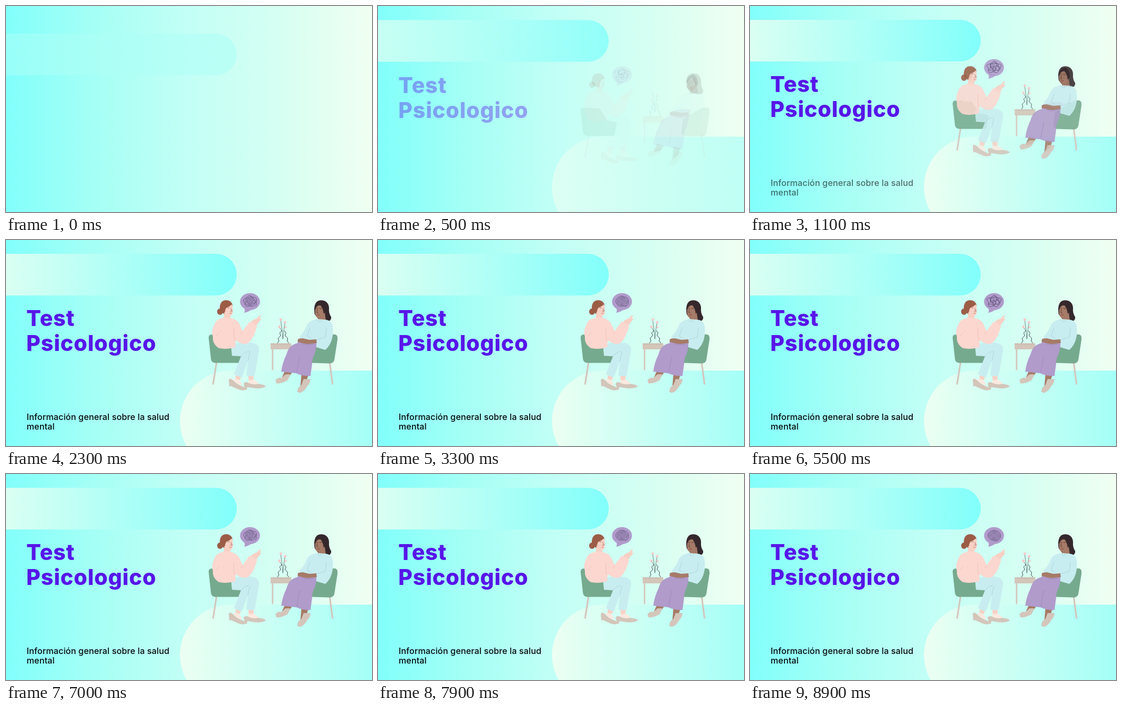
These frames come from a looping animation (690x388 px, 9000 ms). An HTML page with a canvas:

```html
<!DOCTYPE html>
<html lang="es">
<head>
<meta charset="utf-8">
<style>
  html, body { margin: 0; width: 100%; height: 100%; overflow: hidden; background: #b8fff7; }
  canvas { display: block; }
</style>
</head>
<body>
<canvas id="stage" width="690" height="388"></canvas>
<script>
const W = 690, H = 388, LOOP = 9000, STEP = 100, KNOT = 4500;
const c = document.getElementById('stage').getContext('2d');
const clamp = v => Math.max(0, Math.min(1, v));

const GREEN = '#76aa8e', BLUE = '#c8edf0', PINK = '#fcd7cf', SKIN = '#f8d0c4', PALE = '#fbe8df',
  TAN = '#d3c5b9', LILAC = '#b09bcb', BROWN = '#a67b67', DARK = '#35282c', HAIR = '#9c5d46';

function fill(color, d) {
  c.fillStyle = color;
  c.fill(new Path2D(d));
}

function line(color, width, d) {
  c.strokeStyle = color;
  c.lineWidth = width;
  c.lineCap = c.lineJoin = 'round';
  c.stroke(new Path2D(d));
}

function blob(color, x, y, rx, ry = rx) {
  c.fillStyle = color;
  c.beginPath();
  c.ellipse(x, y, rx, ry, 0, 0, 7);
  c.fill();
}

function ramp(x0, x1, ...colors) {
  const g = c.createLinearGradient(x0, 0, x1, 0);
  colors.forEach((k, i) => g.addColorStop(i / (colors.length - 1), k));
  return g;
}

// Fades a part in while it rises to its place
function rise(t, start, length, draw) {
  const p = clamp((t - start) / length);
  if (!p) return;
  c.save();
  c.globalAlpha = p;
  c.translate(0, 26 * (1 - p) ** 5);
  draw();
  c.restore();
}

function backdrop() {
  c.fillStyle = ramp(0, W, '#82fffb', '#a6fff5', '#c3fff6', '#d6fff2', '#f0fff2');
  c.fillRect(0, 0, W, H);
}

function pill(t) {
  const p = clamp(t / 700);
  c.save();
  c.globalAlpha = 0.25 + 0.75 * p;
  c.translate(0, 26 * (1 - p) ** 3);
  c.fillStyle = ramp(0, 435, '#daFFF2', '#82fffb');
  c.beginPath();
  c.roundRect(-60, 26, 495, 78.5, 39.25);
  c.fill();
  c.restore();
}

function base() {
  c.fillStyle = ramp(328, W, '#ecfff2', '#a4fff7');
  c.beginPath();
  c.roundRect(328, 246, 460, 190, 95);
  c.fill();
}

function text(lines, font, color, x, y, gap, spacing) {
  c.font = font + ' Inter, sans-serif';
  c.letterSpacing = spacing;
  c.fillStyle = color;
  lines.forEach((s, i) => c.fillText(s, x, y + i * gap));
}

// A spiral whose loops are tangled at first and then smooth out
function knot(t) {
  const p = (t % KNOT) / KNOT;
  const mess = (1 - p) ** 1.5, turns = 5, n = 320;
  c.beginPath();
  for (let i = 0; i <= n; i++) {
    const u = i / n, a = u * turns * 2 * Math.PI + p * 1.5;
    const r = (1 + 12 * u) * (1 + mess * 0.25 * Math.sin(a * 5.3 + 2 * p));
    const k = mess ** 2 * 5 * Math.sin(Math.PI * u);
    c.lineTo(460 + r * Math.cos(a) + k * Math.sin(a * 1.7 + 1),
      116 + r * 0.84 * Math.sin(a) + k * 0.8 * Math.cos(a * 2.3));
  }
  c.strokeStyle = '#4a3f60';
  c.lineWidth = 0.75;
  c.stroke();
}

function bubble(t) {
  blob(LILAC, 460, 116, 18.8, 16);
  fill(LILAC, 'M448 126 Q452 132 449 137 Q457 136 464 130Z');
  knot(t);
}

function chair(leg, body) {
  line(TAN, 3, leg);
  fill(GREEN, body);
}

function listener() {
  chair('M397 230 L390.5 271',
    'M382 184 Q382 178 388 178 L418 180 L432 202 L450 206 L446 229 Q445 231 441 231.5 L395 231.5 Q388 231 386.5 225Z');
  // feet, then trousers
  fill(SKIN, 'M433 250 L444 254 L441 264 L433 262Z M456 252 L467 252 L466 265 L458 265Z');
  fill(BLUE, 'M424 197 Q446 191 466 194 Q479 198 477 209 L469 255 Q461 258 453 255 L456 228 L445 258 Q436 258 430 252 L443 219 L426 218Z');
  line('#a9cfdb', 0.8, 'M456 228 L460 211 M443 219 Q449 211 458 210');
  fill(TAN, 'M420 263 Q423 259 428 264 Q434 271 444 275 Q452 278 452 282 Q444 285 435 280 L424 275 L421 276Z');
  fill(TAN, 'M448 271 Q449 267 455 268 Q465 273 475 271 Q488 272 490 276 Q480 281 468 279 L455 277 L454 282 L451 282Z');
  fill(PALE, 'M429 262 Q441 261 445 273 Q435 273 429 264Z M457 264 L467 263 L477 270 Q466 274 457 269Z');
  // head
  blob(HAIR, 403.5, 135, 5.5, 6);
  fill(HAIR, 'M403 129 Q403 114 415 113.3 Q425 114 427.5 123 L420 126 L417 140 L411 139 Q404 136 403 129Z');
  fill(SKIN, 'M412 135 L423 139 L423 150 L410 149Z');
  fill(SKIN, 'M415 128 Q422 125 426.5 121 Q428 130 427.5 138 Q425 144 419 143 Q413 141 413 133Z');
  line('#7d4a3e', 0.7, 'M418 128 L421 127.5 M424 129 L426.5 134 L423 134');
  line('#d8716a', 1.1, 'M422 138 L425 138');
  // jumper and raised hand
  fill(SKIN, 'M460 158 L464 152 Q469 149 474 147 L478 142 Q481.5 142 480 145 L478 148 L482 149 L476 155 L471 163Z');
  fill(PINK, 'M409 147 Q417 145 424 147 Q436 150 440 158 L446 172 L459 154 Q468 156 473 163 Q467 185 458 193 Q450 199 440 193 L433 189 L432 202 Q414 207 401 203.5 Q389 196 390 182 Q386 172 393 159 Q396 149 409 147Z');
  line('#e9b8ad', 0.7, 'M430 166 Q428 178 431 190 M397 181 Q399 176 402 174 M446 172 L443 178');
}

function table() {
  line(TAN, 2.6, 'M502.5 203 V244');
  fill(TAN, 'M499 194.5 H538 V206 H499Z');
  line('#bba99d', 0.7, 'M500 196 H534');
  line('#46545a', 0.7, 'M522 186 L520 166 L518 152 M522 186 L524 168 L526 156 M520.5 172 L516 165');
  line('#303c40', 0.9, 'M520 171 L516 175 L518 180 L513 185 L514.5 190 L512 194 M525 171 L528 175 L526 180 L531 185 L530 190 L533 194');
  blob('#f6c9c8', 518, 150, 2.4);
  blob('#f6c9c8', 515.5, 163.5, 2.4);
  blob('#f6c9c8', 526, 155, 2.4);
  blob('#f6c9c8', 527, 164, 2);
}

function speaker() {
  chair('M610 229 L615.5 271',
    'M575 200 L604 182 Q613 177 621 178 Q625.5 179 625 187 L619 226 Q617 232.5 610 232.5 L577 231.5 Q571 229 572 222Z');
  // legs and sandals
  fill(BROWN, 'M526 246 L539 250 L532 260 L519 262Z M557 252 L570 254 L566 267 L555 276Z');
  fill(TAN, 'M508 264 Q513 258 519 260 L527 253 L536 253 L531 264 Q519 271 510 270Z');
  fill(TAN, 'M549 286 Q550 276 557 273 L561 262 L574 262 Q574 269 568 275 Q562 286 554 288Z');
  fill(LILAC, 'M550 187 Q569 178 590 182 L582 214 Q577 222 577 234 L574 256 Q560 257 547 251 L519 248 Q521 231 529 215 Q533 198 550 194Z');
  line('#9983b8', 0.7, 'M548 249 L554 219 M560 196 Q570 199 580 196');
  // hair behind, body, head
  fill(DARK, 'M582 140 Q578 114 594 113.5 Q608 114 609 128 Q608 138 613 145 Q614 152 606 153 L590 150Z');
  fill(BROWN, 'M590 138 L601 137 L603 152 L588 152Z');
  fill(BLUE, 'M587 149 L602 150 Q613 151 615.5 161 Q618 175 614 188 Q611 199 602 207 L585 202 L585 193 L575 192 L555 187 L554 181 Q561 175 566 163 Q570 151 587 149Z');
  fill(BROWN, 'M552 186 L559 185 L572 188 L585 187 L586 194 L570 196 Q559 195 550 192 Q549 188 552 186Z');
  line('#a7cdd9', 0.8, 'M573 166 L568 181 L575 185 M604 166 L602 183 L586 188 M586 150 L590 154 L596 152');
  fill(BROWN, 'M583 126 Q590 121 597 124 L600 134 Q598 144 591 147 Q584 147 583 140Z');
  fill(DARK, 'M581 131 Q583 118 594 116 Q603 119 603 134 L599 139 Q598 129 592 121.5 Q586 123 583 131Z');
  line('#4c302c', 0.8, 'M585 129 L588 128.5 M591 129 L595 129 M587 131 L586 137 L588 137');
  line('#7c3f3f', 1.1, 'M587 141 L591 141');
}

function scene(t) {
  bubble(t);
  listener();
  table();
  speaker();
}

function draw(t) {
  c.globalAlpha = 1;
  backdrop();
  pill(t);
  rise(t, 50, 700, base);
  rise(t, 200, 750, () =>
    text(['Test', 'Psicologico'], '800 41px', '#5716e8', 38.3, 162, 46.5, '0.8px'));
  rise(t, 400, 800, () => scene(t));
  rise(t, 600, 850, () =>
    text(['Información general sobre la salud', 'mental'], '500 16px', '#060808', 39, 339, 18, '0.15px'));
}

function tick() {
  const t = performance.now() % LOOP;
  draw(Math.floor(t / STEP) * STEP);
  requestAnimationFrame(tick);
}
tick();
</script>
</body>
</html>
```
